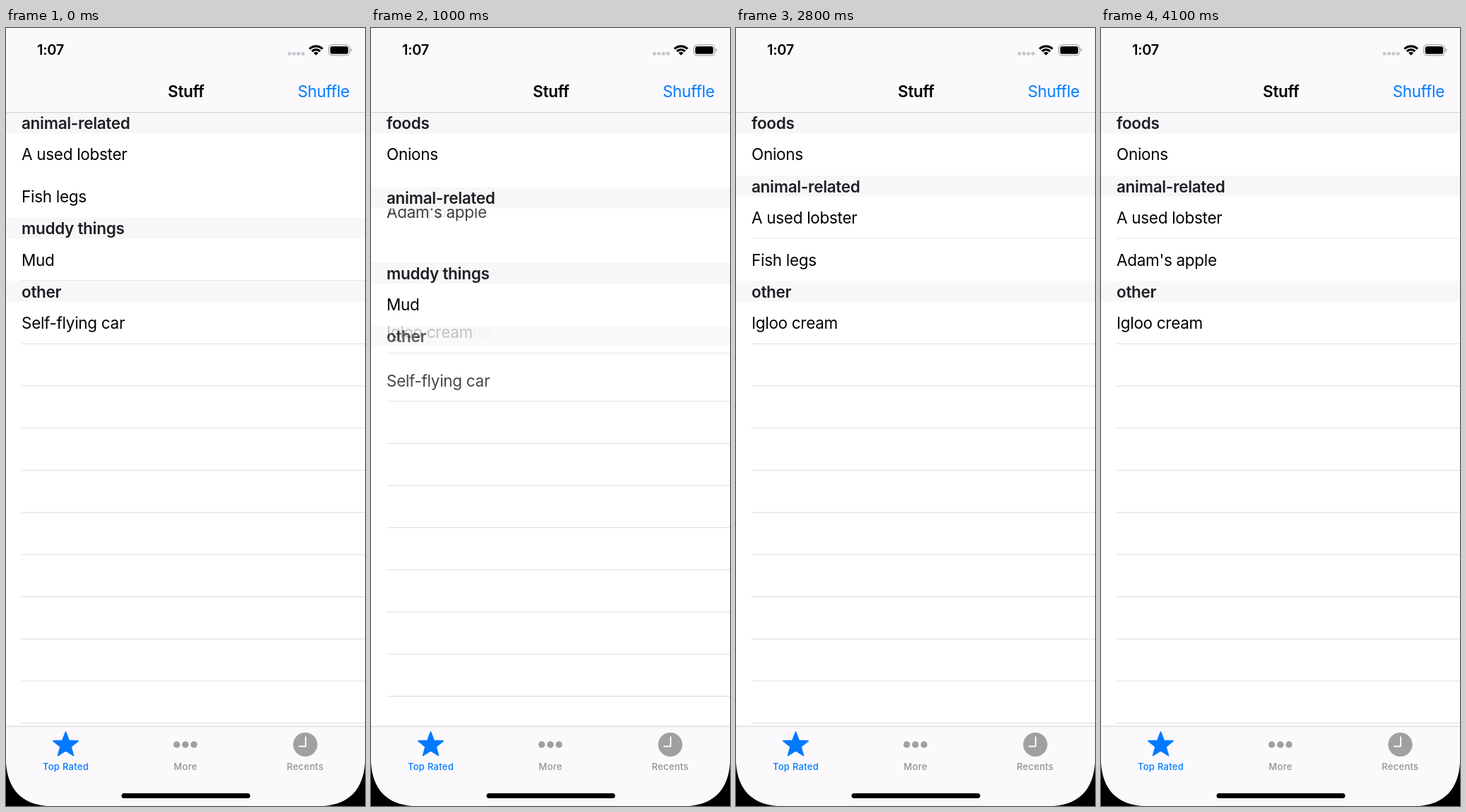
Recreate the animation shown at these times as an HTML page. Size 508 by 1102 pixels, loop 4200 ms.

```html
<!DOCTYPE html>
<html lang="en">
<head>
<meta charset="utf-8">
<title>Shuffled list</title>
<style>
  html, body { margin: 0; width: 100%; height: 100%; overflow: hidden; background: #fff; }
  svg { display: block; width: 100%; height: 100%; }
  text { font-family: Inter, Roboto, "Liberation Sans", sans-serif; font-size: 22.5px; letter-spacing: -.3px; }
  .bold { font-weight: 600; }
  .head { font-weight: 600; fill: #1f1e22; }
  .tab { font-size: 13px; font-weight: 500; letter-spacing: .3px; text-anchor: middle; }
</style>
</head>
<body>
<svg viewBox="0 0 508 1102">
  <rect width="508" height="1102" fill="#fff"/>
  <g id="list"></g>

  <!-- status and navigation bar -->
  <rect width="508" height="119.5" fill="#fbf9fc"/>
  <rect y="119" width="508" height="1" fill="#cfced1"/>
  <text class="bold" x="63" y="38.4" text-anchor="middle" style="font-size:20px">1:07</text>
  <g fill="#c9c7cb">
    <circle cx="401" cy="36.3" r="2.5"/><circle cx="407.4" cy="36.3" r="2.5"/>
    <circle cx="413.8" cy="36.3" r="2.5"/><circle cx="420.2" cy="36.3" r="2.5"/>
  </g>
  <g id="wifi" fill="none" stroke="#000" stroke-width="3.3"></g>
  <rect x="456.7" y="23.8" width="29.6" height="15" rx="4.6" fill="none" stroke="#a9a8ab" stroke-width="1.3"/>
  <rect x="458.8" y="25.9" width="25.4" height="10.8" rx="2.8"/>
  <path d="M487.6 28.8q1.9 .7 1.9 2.5t-1.9 2.5z" fill="#a9a8ab"/>
  <text class="bold" x="254.8" y="98" text-anchor="middle">Stuff</text>
  <text id="shuffle" x="486" y="98" text-anchor="end" fill="#007aff">Shuffle</text>

  <!-- tab bar -->
  <rect y="989" width="508" height="113" fill="#fbf9fc"/>
  <rect y="988.7" width="508" height="1" fill="#cfced1"/>
  <path id="star" fill="#007aff" stroke="#007aff" stroke-width="1.6" stroke-linejoin="round"/>
  <g fill="#a09fa2">
    <circle cx="241.6" cy="1015" r="4.7"/><circle cx="253.8" cy="1015" r="4.7"/><circle cx="266" cy="1015" r="4.7"/>
    <circle cx="423.5" cy="1015" r="17.1"/>
  </g>
  <path d="M424 1003.5V1017.5H414" fill="none" stroke="#fbf9fc" stroke-width="1.9"/>
  <text class="tab" x="84.5" y="1051" fill="#007aff">Top Rated</text>
  <text class="tab" x="254" y="1051" fill="#929195">More</text>
  <text class="tab" x="423.3" y="1051" fill="#929195">Recents</text>
  <rect x="163.5" y="1084" width="182" height="7" rx="3.5"/>
  <path id="corner" d="M0 1040C2 1078 22 1099 58 1102H0Z"/>
  <use href="#corner" transform="matrix(-1 0 0 1 508 0)"/>
</svg>
<script>
const LOOP = 4200, STEP = 100, DURATION = 300;
const TOP = 119.4, ROW = 59.71, HEAD = 29.86, BOTTOM = 990;

const states = [
  { 'animal-related': ['A used lobster', 'Fish legs'], 'muddy things': ['Mud'], other: ['Self-flying car'] },
  { foods: ['Onions', 'Pineapples'], 'animal-related': ['Cats', 'A used lobster'], 'muddy things': ['Mud'] },
  { foods: ['Onions'], 'animal-related': ["Adam's apple"], 'muddy things': ['Mud'], other: ['Igloo cream', 'Self-flying car'] },
  { foods: ['Onions'], 'animal-related': ['A used lobster', 'Fish legs'], other: ['Igloo cream'] },
  { foods: ['Onions'], 'animal-related': ['Cats', 'Fish legs', "Adam's apple"], other: ['Splinters', 'Igloo cream', 'Self-flying car'] },
  { foods: ['Onions'], 'animal-related': ['A used lobster', "Adam's apple"], other: ['Igloo cream'] }
].map(layout);
const starts = [100, 810, 1810, 2900, 3800];

const byId = id => document.getElementById(id);
const mix = (a, b, p) => a + (b - a) * p;
const clamp = v => Math.max(0, Math.min(1, v));

function layout(sections) {
  const rows = [], heads = [];
  let y = TOP;
  for (const [name, items] of Object.entries(sections)) {
    heads.push({ text: name, y });
    y += HEAD;
    items.forEach((text, i) => {
      rows.push({ text, y, line: i < items.length - 1 });
      y += ROW;
    });
  }
  rows[rows.length - 1].line = true;
  return { rows, heads, end: y };
}

// cubic-bezier(.42, 0, .58, 1)
function easeInOut(x) {
  if (x <= 0 || x >= 1) return clamp(x);
  let lo = 0, hi = 1;
  for (let i = 0; i < 24; i++) {
    const u = (lo + hi) / 2, v = 1 - u;
    if (1.26 * v * v * u + 1.74 * v * u * u + u * u * u < x) lo = u; else hi = u;
  }
  return lo * lo * (3 - 2 * lo);
}

// Appearing and vanishing items travel to or from the slot with the same index.
function tween(from, to, kind, p) {
  const slot = (state, i) => {
    const list = state[kind];
    return i < list.length ? list[i].y : state.end + (kind === 'rows' ? i - list.length : 0) * ROW;
  };
  const find = (state, text) => state[kind].find(item => item.text === text);
  const gone = [], added = [], moved = [];
  from[kind].forEach((item, i) => {
    if (!find(to, item.text)) gone.push({ ...item, y: mix(item.y, slot(to, i), p), alpha: 1 - p });
  });
  to[kind].forEach((item, i) => {
    const old = find(from, item.text);
    if (old) moved.push({ ...item, y: mix(old.y, item.y, p), alpha: 1 });
    else added.push({ ...item, y: mix(slot(from, i), item.y, p), alpha: p });
  });
  return [...gone, ...added, ...moved].filter(item => item.alpha > 0);
}

const line = y => `<rect x="22" y="${y - 1}" width="486" height="1.1" fill="#dfdfe2"/>`;
const group = (item, body) => `<g transform="translate(0 ${item.y.toFixed(2)})" opacity="${item.alpha}">${body}</g>`;
const drawRow = row => group(row,
  `<rect width="508" height="${ROW}" fill="#fff"/><text x="22" y="38.2">${row.text}</text>${row.line ? line(ROW) : ''}`);
const drawHead = head => group(head,
  `<rect width="508" height="${HEAD}" fill="#f7f6f9"/><text class="head" x="22" y="23.8">${head.text}</text>`);

function draw(t) {
  const i = Math.max(0, starts.filter(s => s <= t).length - 1);
  const from = states[i], to = states[i + 1];
  const p = easeInOut((t - starts[i]) / DURATION);
  let svg = '';
  for (let y = mix(from.end, to.end, p) + ROW; y < BOTTOM; y += ROW) svg += line(y);
  svg += tween(from, to, 'rows', p).map(drawRow).join('');
  svg += tween(from, to, 'heads', p).map(drawHead).join('');
  byId('list').innerHTML = svg;

  // the tapped button dims, then recovers
  const tap = starts.map(s => t - Math.floor(s / STEP) * STEP).find(d => d >= 0 && d < 200);
  byId('shuffle').setAttribute('opacity', tap === undefined ? 1 : mix(.35, 1, tap / 200));
}

function buildIcons() {
  const arc = r => {
    const d = r * Math.SQRT1_2;
    return `M${438.7 - d} ${38.8 - d}A${r} ${r} 0 0 1 ${438.7 + d} ${38.8 - d}`;
  };
  byId('wifi').innerHTML = `<path d="${arc(13)}${arc(8.1)}"/><path d="${arc(4.9)}L438.7 38.8Z" fill="#000" stroke="none"/>`;
  const points = Array.from({ length: 10 }, (_, k) => {
    const r = k % 2 ? 7.9 : 18.6, a = k * Math.PI / 5;
    return `${84.5 + r * Math.sin(a)} ${1015.6 - r * Math.cos(a)}`;
  });
  byId('star').setAttribute('d', `M${points.join('L')}Z`);
}

let shown = -1;
function tick() {
  const t = Math.floor(performance.now() % LOOP / STEP) * STEP;
  if (t !== shown) draw(shown = t);
  requestAnimationFrame(tick);
}

buildIcons();
tick();
</script>
</body>
</html>
```
